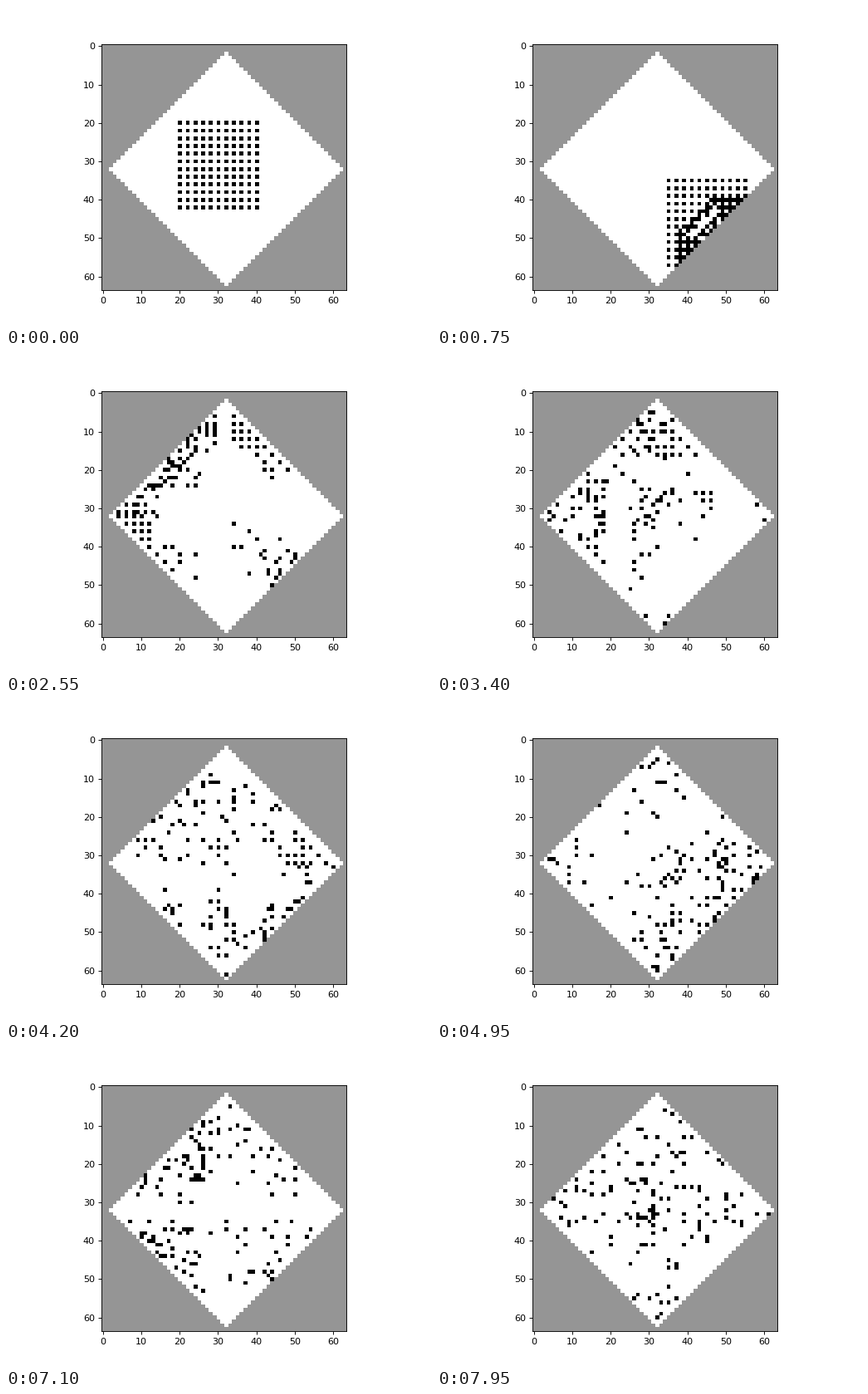
These frames come from a looping animation (512x384 px, 8000 ms). A matplotlib script:

```python
import numpy as np
import matplotlib.pyplot as plt
from matplotlib.animation import FuncAnimation

SIZE = 64
FRAMES = 160
INTERVAL = 50

rows, cols = np.indices((SIZE, SIZE))
WALL = abs(rows - 32) + abs(cols - 32) > 30


def corners(grid):
    """Top-left, top-right, bottom-left and bottom-right cell of every 2x2 block."""
    return grid[::2, ::2], grid[::2, 1::2], grid[1::2, ::2], grid[1::2, 1::2]


def step(gas, odd):
    """One lattice gas step on the even or odd block partition."""
    gas = np.roll(gas, (-odd, -odd), (0, 1))
    wall = np.roll(WALL, (-odd, -odd), (0, 1))
    tl, tr, bl, br = corners(gas)

    blocked = np.logical_or.reduce(corners(wall))
    # Exactly two particles on one diagonal meet head-on and turn by 90 degrees.
    crash = (tl == br) & (tr == bl) & (tl != tr)

    new = np.empty_like(gas)
    moved = zip(corners(new), (tl, tr, bl, br), (br, bl, tr, tl), (tr, tl, br, bl))
    for out, here, opposite, turned in moved:
        out[:] = np.where(blocked, here, np.where(crash, turned, opposite))
    return np.roll(new, (odd, odd), (0, 1))


def simulate():
    gas = np.zeros((SIZE, SIZE), bool)
    gas[20:43:2, 20:41:2] = True
    history = [gas]
    for n in range(FRAMES - 1):
        history.append(step(history[-1], n % 2))
    return history


def picture(gas):
    return np.where(gas, 2, WALL.astype(int))


states = simulate()

fig, ax = plt.subplots(figsize=(6.4, 4.8), dpi=80)
image = ax.imshow(picture(states[0]), cmap="Greys", vmin=0, vmax=2,
                  interpolation="nearest")


def draw(n):
    image.set_data(picture(states[n]))
    return (image,)


anim = FuncAnimation(fig, draw, frames=FRAMES, interval=INTERVAL, repeat=True)
plt.show()
```
